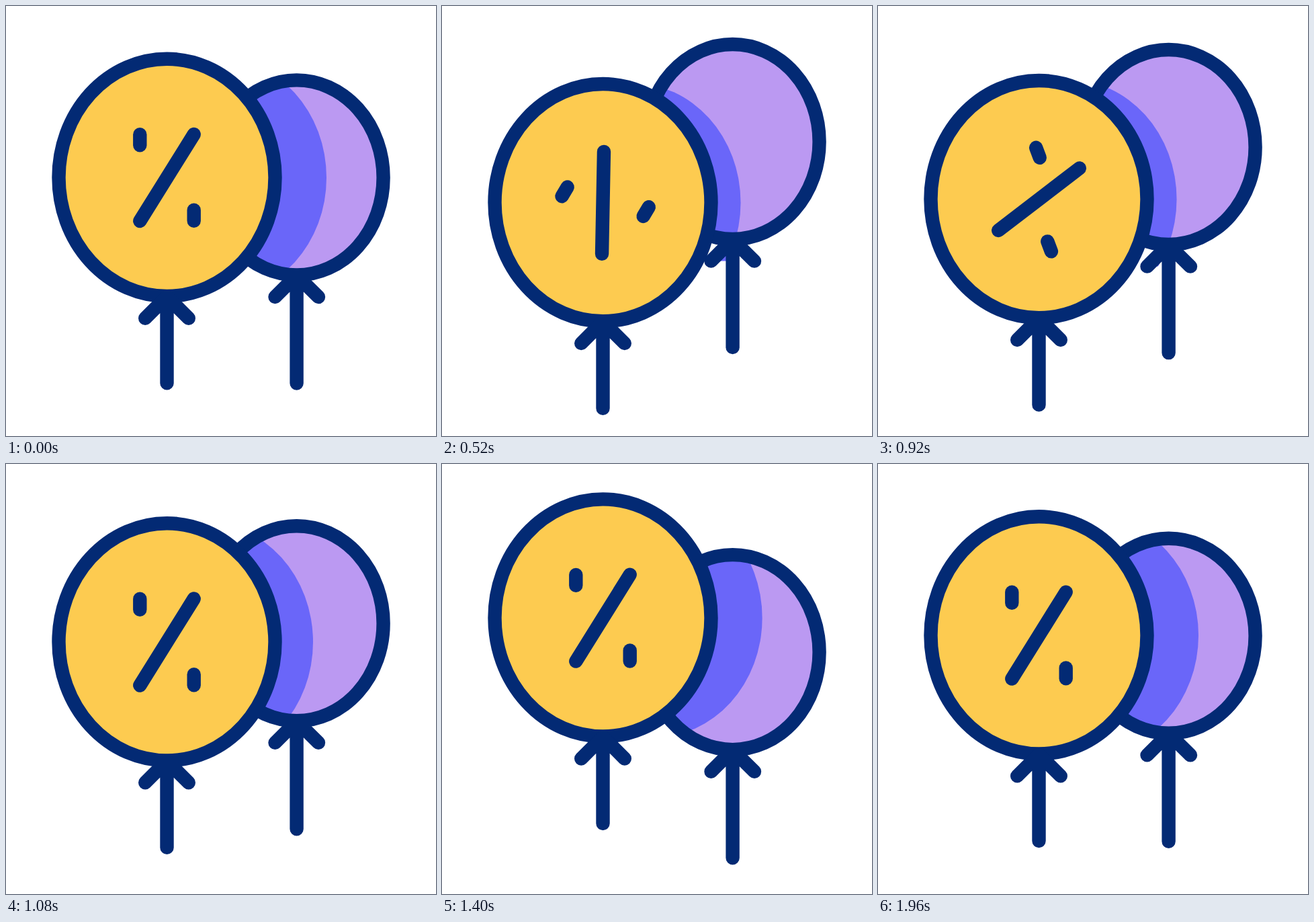
Write an HTML page that moves like this. It is 640 by 640 pixels and loops after 2 s.

```html
<!DOCTYPE html>
<html lang="en">
<head>
<meta charset="utf-8">
<title>Balloons</title>
<style>
  html, body { margin: 0; height: 100%; overflow: hidden; background: #fff; }
  svg { display: block; width: 100vw; height: 100vh; }
  .line { fill: none; stroke: #032a74; stroke-width: 20.4; stroke-linecap: round; stroke-linejoin: round; }
</style>
</head>
<body>
<svg viewBox="0 0 640 640">
  <defs>
    <clipPath id="inside">
      <ellipse cx="432.6" cy="255.4" rx="129" ry="145"/>
      <path d="M400.5 433 432.6 401 465 433z"/>
    </clipPath>
  </defs>
  <g id="back">
    <ellipse cx="432.6" cy="255.4" rx="129" ry="145" fill="#bb99f2"/>
    <g clip-path="url(#inside)">
      <ellipse id="shade" rx="161" ry="178" fill="#6a66f9"/>
    </g>
    <g class="line">
      <ellipse cx="432.6" cy="255.4" rx="129" ry="145"/>
      <path d="M400.5 433 432.6 401 465 433M432.6 401V561.5"/>
    </g>
  </g>
  <g id="front">
    <ellipse class="line" cx="239.5" cy="255.3" rx="161" ry="176.6" style="fill:#fdcb50"/>
    <path class="line" d="M207.2 464.8 239.5 432.5 271.8 464.8M239.5 432.5V561.4"/>
    <g class="line" transform="translate(239.5 255.5)">
      <path id="slash" d="M40.2-64.5-40.2 64.5"/>
      <path id="dotA" d="M0-8V8"/>
      <path id="dotB" d="M0-8V8"/>
    </g>
  </g>
</svg>
<script>
const LOOP = 2000, STEP = 40;
const part = id => document.getElementById(id);
const move = (id, x, y, turn = 0) =>
  part(id).setAttribute('transform', `translate(${x} ${y}) rotate(${turn})`);

const smooth = s => s * s * (3 - 2 * s);

// Bezier ease (1/6, 1/6, 2/3, 1): brisk start, soft stop
function softStop(s) {
  let lo = 0, hi = 1;
  for (let i = 0; i < 24; i++) {
    const u = (lo + hi) / 2;
    if (u / 2 + u * u - u ** 3 / 2 < s) lo = u; else hi = u;
  }
  return lo / 2 + 2 * lo * lo - 1.5 * lo ** 3;
}

const progress = (t, from, to) => Math.min(1, Math.max(0, (t - from) / (to - from)));

// Value at t for keys at 0, 720, 1440 and 2000 ms, starting and ending at 0
function sway(t, a, b, firstEase = smooth) {
  if (t < 720) return a * firstEase(t / 720);
  if (t < 1440) return a + (b - a) * smooth((t - 720) / 720);
  return b * (1 - smooth((t - 1440) / 560));
}

const cubic = (u, a, b, c, d) =>
  (1 - u) ** 3 * a + 3 * (1 - u) ** 2 * u * b + 3 * (1 - u) * u * u * c + u ** 3 * d;

function draw(t) {
  const frontY = sway(t, 46, -27);
  const backY = sway(t, -61.8, 25.5, softStop);
  move('front', 0, frontY);
  move('back', 0, backY);
  move('shade', 316 + sway(t, -40, 0), 255.4 + frontY - backY);

  // The sign makes half a turn while its dots trade places
  const u = smooth(progress(t, 320, 1080));
  move('slash', 0, 0, -180 * u);
  move('dotA', cubic(u, -40.2, -90, -34, 40.2), cubic(u, -56.3, 20, 113, 56.3), 180 * u);
  move('dotB', cubic(u, 40.2, 100, 85, -40.2), cubic(u, 56.3, -30, -109, -56.3), 180 * u);
}

const start = performance.now();
function tick() {
  const t = (performance.now() - start) % LOOP;
  draw(Math.floor(t / STEP) * STEP);
  requestAnimationFrame(tick);
}
tick();
</script>
</body>
</html>
```
